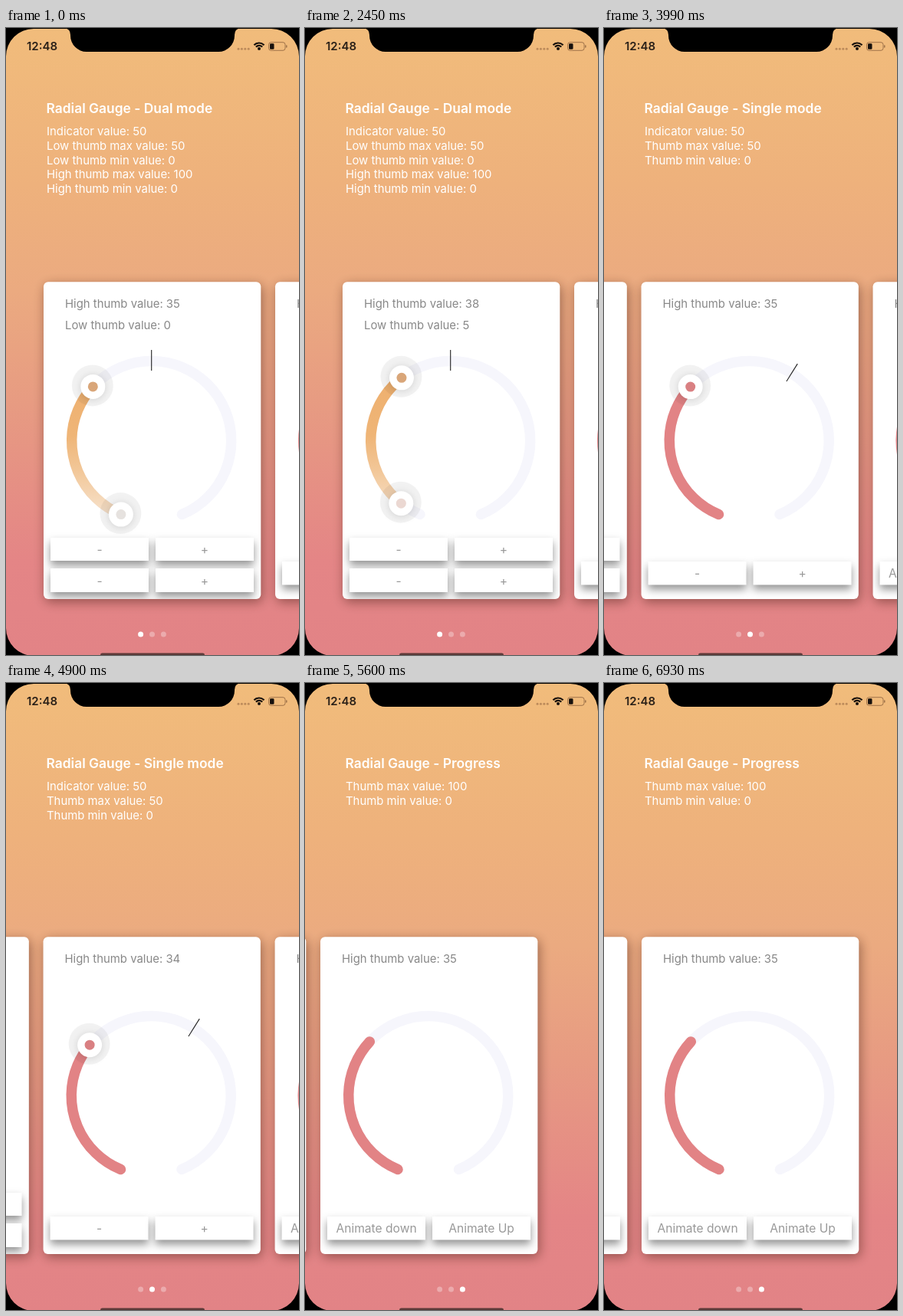
These frames come from a looping animation (382 by 818 pixels, 7000 ms). An HTML page with a canvas:

```html
<!DOCTYPE html>
<html lang="en">
<head>
<meta charset="utf-8">
<title>Radial gauges</title>
<style>
html, body { margin: 0; width: 100%; height: 100%; overflow: hidden; background: #000; }
canvas { display: block; width: 382px; height: 818px; }
</style>
</head>
<body>
<canvas></canvas>
<script>
const W = 382, H = 818, LOOP = 7000, PAGE = 302;
const canvas = document.querySelector('canvas');
const ctx = canvas.getContext('2d');
const dpr = window.devicePixelRatio || 1;
canvas.width = W * dpr;
canvas.height = H * dpr;
ctx.scale(dpr, dpr);

const FONT = 'Inter, Roboto, sans-serif';
const CENTER = { x: 189.7, y: 538.5 }, RADIUS = 104;
const RED = '#e28385';

const headers = [
  ['Radial Gauge - Dual mode', 'Indicator value: 50', 'Low thumb max value: 50',
    'Low thumb min value: 0', 'High thumb max value: 100', 'High thumb min value: 0'],
  ['Radial Gauge - Single mode', 'Indicator value: 50', 'Thumb max value: 50', 'Thumb min value: 0'],
  ['Radial Gauge - Progress', 'Thumb max value: 100', 'Thumb min value: 0']
];

// [time, value] keys
const scrollKeys = [
  [2590, 0], [2730, .13], [2870, .5], [3010, .82], [3150, .945], [3360, .9934], [3500, 1.0015],
  [5040, 1.0015], [5180, 1.4], [5320, 2.05], [5400, 2.21], [5530, 2.14], [5700, 2.045], [5880, 2.01], [6200, 2]
];
const highKeys = [[300, 35], [1500, 38]];
const lowKeys = [[1600, 0], [2400, 5]];
const singleKeys = [[3900, 35], [4600, 34]];

// Smooth curve through the keys, flat at the ends and at turning points.
function track(keys, t) {
  const last = keys.length - 1;
  if (t <= keys[0][0]) return keys[0][1];
  if (t >= keys[last][0]) return keys[last][1];
  const i = keys.findIndex(k => k[0] > t) - 1;
  const rate = j => (keys[j + 1][1] - keys[j][1]) / (keys[j + 1][0] - keys[j][0]);
  const slope = j => {
    if (j === 0 || j === last) return 0;
    const a = rate(j - 1), b = rate(j);
    return a * b <= 0 ? 0 : 2 * a * b / (a + b);
  };
  const [t0, v0] = keys[i], [t1, v1] = keys[i + 1];
  const d = t1 - t0, u = (t - t0) / d, w = 1 - u;
  return v0 * w * w * (1 + 2 * u) + v1 * u * u * (3 - 2 * u)
    + d * u * w * (w * slope(i) - u * slope(i + 1));
}

const ramp = (t, start, length) => Math.min(1, Math.max(0, (t - start) / length));

function gradient(y0, y1, stops) {
  const g = ctx.createLinearGradient(0, y0, 0, y1);
  stops.forEach(([at, color]) => g.addColorStop(at, color));
  return g;
}

function text(str, x, y, size, color, weight = 400, align = 'left') {
  ctx.font = `${weight} ${size}px ${FONT}`;
  ctx.textAlign = align;
  ctx.fillStyle = color;
  ctx.fillText(str, x, y);
}

function disc(x, y, r, color) {
  ctx.beginPath();
  ctx.arc(x, y, r, 0, 2 * Math.PI);
  ctx.fillStyle = color;
  ctx.fill();
}

function box(x, y, w, h, r, color) {
  ctx.beginPath();
  ctx.roundRect(x, y, w, h, r);
  ctx.fillStyle = color;
  ctx.fill();
}

function withShadow(color, blur, dx, dy, draw) {
  ctx.save();
  ctx.shadowColor = color;
  ctx.shadowBlur = blur * dpr;
  ctx.shadowOffsetX = dx * dpr;
  ctx.shadowOffsetY = dy * dpr;
  draw();
  ctx.restore();
}

// The dial spans 315 degrees with its gap at the bottom.
const angle = value => (112.5 + 3.15 * value) * Math.PI / 180;
const onDial = (value, r = RADIUS) =>
  [CENTER.x + r * Math.cos(angle(value)), CENTER.y + r * Math.sin(angle(value))];

function arc(from, to, color) {
  ctx.beginPath();
  ctx.arc(CENTER.x, CENTER.y, RADIUS, angle(from), angle(to));
  ctx.strokeStyle = color;
  ctx.lineWidth = 13.5;
  ctx.lineCap = 'round';
  ctx.stroke();
}

function thumb(value, color) {
  const [x, y] = onDial(value);
  disc(x - .5, y - 1.5, 27, 'rgba(0,0,0,.05)');
  withShadow('rgba(0,0,0,.14)', 9, 0, 1, () => disc(x, y, 16, '#fff'));
  disc(x, y, 6.5, color);
}

function indicator(value) {
  ctx.beginPath();
  ctx.moveTo(...onDial(value, 91.5));
  ctx.lineTo(...onDial(value, 118.5));
  ctx.strokeStyle = '#222';
  ctx.lineWidth = 1.1;
  ctx.lineCap = 'butt';
  ctx.stroke();
}

function buttonRow(y, h, labels) {
  labels.forEach((label, i) => {
    const x = 58 + i * 137;
    withShadow('rgba(0,0,0,.42)', 11, 0, 6, () => box(x, y, 128, h, 0, '#fff'));
    text(label, x + 64, y + h / 2 + 6, 15.6, '#999', 400, 'center');
  });
}

function card(page, draw) {
  ctx.save();
  ctx.translate(page * PAGE, 0);
  withShadow('rgba(70,30,20,.5)', 15, 2, 4, () => box(49, 331.3, 283.3, 413.7, 6, '#fff'));
  ctx.beginPath();
  ctx.roundRect(49, 331.3, 283.3, 413.7, 6);
  ctx.clip();
  arc(0, 100, '#f6f6fc');
  draw();
  ctx.restore();
}

const label = (name, value, y) =>
  text(`${name} thumb value: ${Math.round(value)}`, 77, y, 14.9, '#888');

function drawCards(t) {
  const high = track(highKeys, t), low = track(lowKeys, t), single = track(singleKeys, t);

  card(0, () => {
    label('High', high, 364.7);
    label('Low', low, 392.7);
    buttonRow(665, 30, ['-', '+']);
    buttonRow(705, 31, ['-', '+']);
    arc(low, high, gradient(460, 640,
      [[0, '#eeb06f'], [.4, '#efb577'], [.65, '#f2c798'], [1, '#f7e4d0']]));
    indicator(50);
    thumb(low, low < 2.5 ? '#e6e2df' : '#ebd8d2');
    thumb(high, '#d9a679');
  });
  card(1, () => {
    label('High', single, 364.7);
    buttonRow(696, 30.5, ['-', '+']);
    arc(0, single, RED);
    indicator(60.2);
    thumb(single, '#d98082');
  });
  card(2, () => {
    label('High', 35, 364.7);
    buttonRow(696, 30.5, ['Animate down', 'Animate Up']);
    arc(0, 35, RED);
  });
}

function drawHeader(lines, alpha) {
  if (alpha <= 0) return;
  ctx.globalAlpha = alpha;
  lines.forEach((line, i) => i
    ? text(line, 53, 121.4 + 18.7 * i, 14.9, '#fff')
    : text(line, 52.5, 111, 17.4, '#fff', 600));
  ctx.globalAlpha = 1;
}

function drawStatusBar() {
  text('12:48', 27, 29.3, 15, '#2a2018', 600);
  for (let i = 0; i < 4; i++) disc(303 + i * 4.4, 27.3, 1.5, 'rgba(90,50,30,.35)');

  // Wi-Fi fan
  ctx.strokeStyle = '#17110d';
  ctx.lineWidth = 2.2;
  ctx.lineCap = 'butt';
  [9, 5.6].forEach(r => {
    ctx.beginPath();
    ctx.arc(330, 28.5, r, -Math.PI * .76, -Math.PI * .24);
    ctx.stroke();
  });
  disc(330, 27, 2, '#17110d');

  // Battery
  ctx.beginPath();
  ctx.roundRect(342.5, 18.7, 21.5, 10.6, 3);
  ctx.strokeStyle = 'rgba(80,45,25,.5)';
  ctx.lineWidth = 1;
  ctx.stroke();
  box(344, 20.2, 5.5, 7.6, 1.3, '#17110d');
  box(365, 22.2, 1.5, 3.6, 1, 'rgba(80,45,25,.5)');
}

function drawPhoneFrame() {
  ctx.fillStyle = '#000';
  ctx.beginPath();
  ctx.rect(0, 0, W, H);
  ctx.roundRect(0, 1, W, H, 36);
  ctx.fill('evenodd');

  ctx.beginPath();
  ctx.moveTo(76, 0);
  ctx.quadraticCurveTo(84, 1, 84, 9);
  ctx.arcTo(84, 31, 106, 31, 21);
  ctx.arcTo(298, 31, 298, 9, 21);
  ctx.lineTo(298, 9);
  ctx.quadraticCurveTo(298, 1, 306, 0);
  ctx.fill();

  box(123, 815.6, 136, 5, 2.5, '#5c3a38');
}

function draw(t) {
  const scroll = track(scrollKeys, t);
  ctx.fillStyle = gradient(0, H, [[0, '#f1bc7b'], [.25, '#eeb17c'], [.42, '#ebaa80'],
    [.6, '#e79b82'], [.85, '#e48586'], [1, '#e28386']]);
  ctx.fillRect(0, 0, W, H);

  const toSingle = ramp(t, 3320, 300), toProgress = ramp(t, 5280, 270);
  drawHeader(headers[0], 1 - toSingle);
  drawHeader(headers[1], toSingle * (1 - toProgress));
  drawHeader(headers[2], toProgress);

  ctx.save();
  ctx.translate(-scroll * PAGE, 0);
  drawCards(t);
  ctx.restore();

  const current = Math.min(2, Math.round(scroll));
  for (let i = 0; i < 3; i++)
    disc(175.6 + i * 14.9, 791, 3.5, i === current ? '#fff' : 'rgba(255,255,255,.32)');

  drawStatusBar();
  drawPhoneFrame();
}

const start = performance.now();
function frame() {
  draw((performance.now() - start) % LOOP);
  requestAnimationFrame(frame);
}
frame();
</script>
</body>
</html>
```
